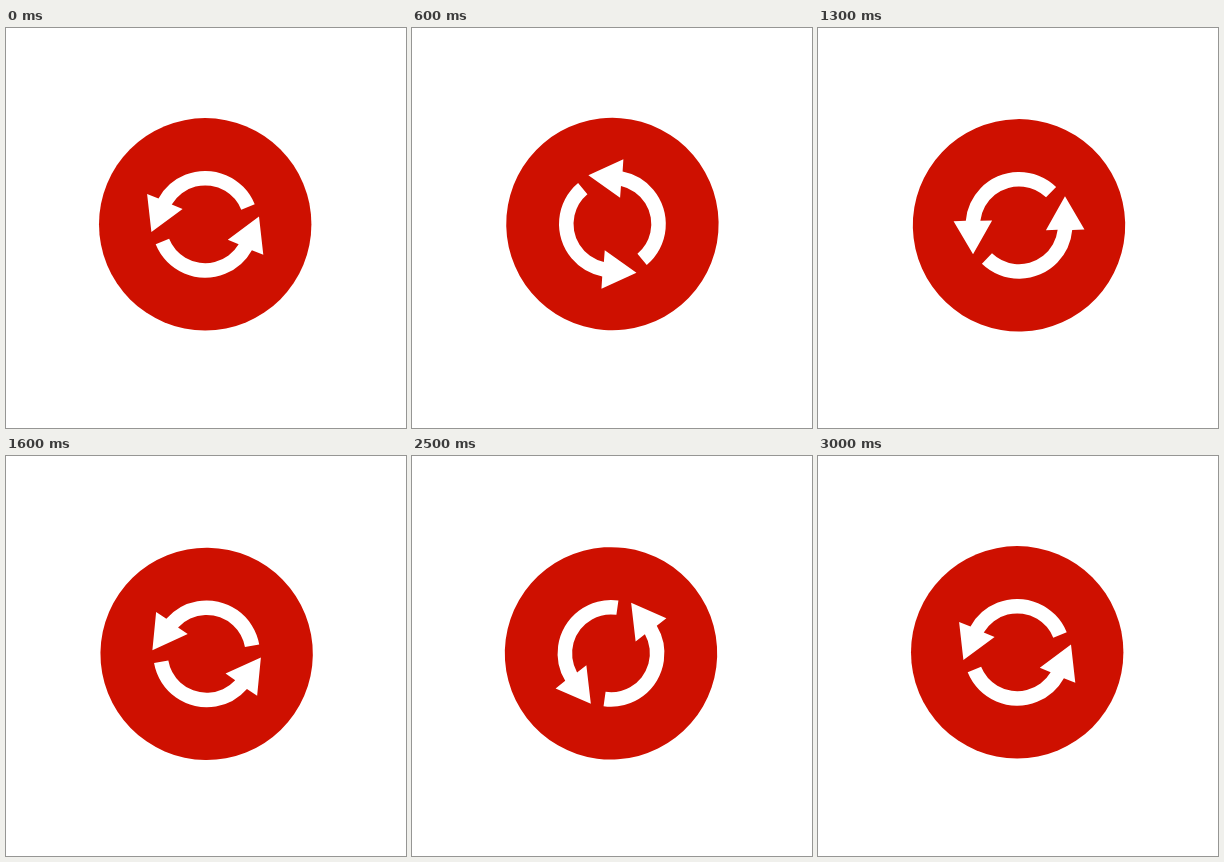
An HTML page with a canvas that plays this animation: 400 by 400 pixels, repeating every 3.1 s.

```html
<!DOCTYPE html>
<html lang="en">
<head>
<meta charset="utf-8">
<title>Refresh spinner</title>
<style>
  html, body { margin: 0; width: 100%; height: 100%; overflow: hidden; background: #fff; }
  canvas { display: block; width: 400px; height: 400px; }
</style>
</head>
<body>
<canvas id="stage" width="400" height="400"></canvas>
<script>
  const ctx = document.getElementById('stage').getContext('2d');
  const LOOP = 3100, STEP = 100, TURN_STEPS = 30;
  const PIVOT = { x: 200, y: 197 };
  const BADGE = { x: -0.8, y: -0.7, radius: 106.2 };
  const rad = deg => deg * Math.PI / 180;

  // One curved arrow around the badge centre, drawn counterclockwise.
  function drawArrow() {
    ctx.beginPath();
    ctx.arc(0, 0, 53.4, rad(-22), rad(-151), true);
    ctx.lineTo(-58.1, -30.4);
    ctx.lineTo(-53.8, 7.8);
    ctx.lineTo(-22.6, -15.4);
    ctx.arc(0, 0, 38.9, rad(-149.3), rad(-22), false);
    ctx.closePath();
    ctx.fill();
  }

  function draw(time) {
    const step = Math.floor((time % LOOP) / STEP);
    ctx.setTransform(1, 0, 0, 1, 0, 0);
    ctx.fillStyle = '#fff';
    ctx.fillRect(0, 0, 400, 400);

    // The badge sits slightly off the pivot, so it wobbles as it turns.
    ctx.translate(PIVOT.x, PIVOT.y);
    ctx.rotate(step / TURN_STEPS * 2 * Math.PI);
    ctx.translate(BADGE.x, BADGE.y);

    ctx.fillStyle = '#ce1000';
    ctx.beginPath();
    ctx.arc(0, 0, BADGE.radius, 0, 2 * Math.PI);
    ctx.fill();

    ctx.fillStyle = '#fff';
    drawArrow();
    ctx.rotate(Math.PI);
    drawArrow();
  }

  const start = performance.now();
  function tick() {
    draw(performance.now() - start);
    requestAnimationFrame(tick);
  }
  tick();
</script>
</body>
</html>
```
